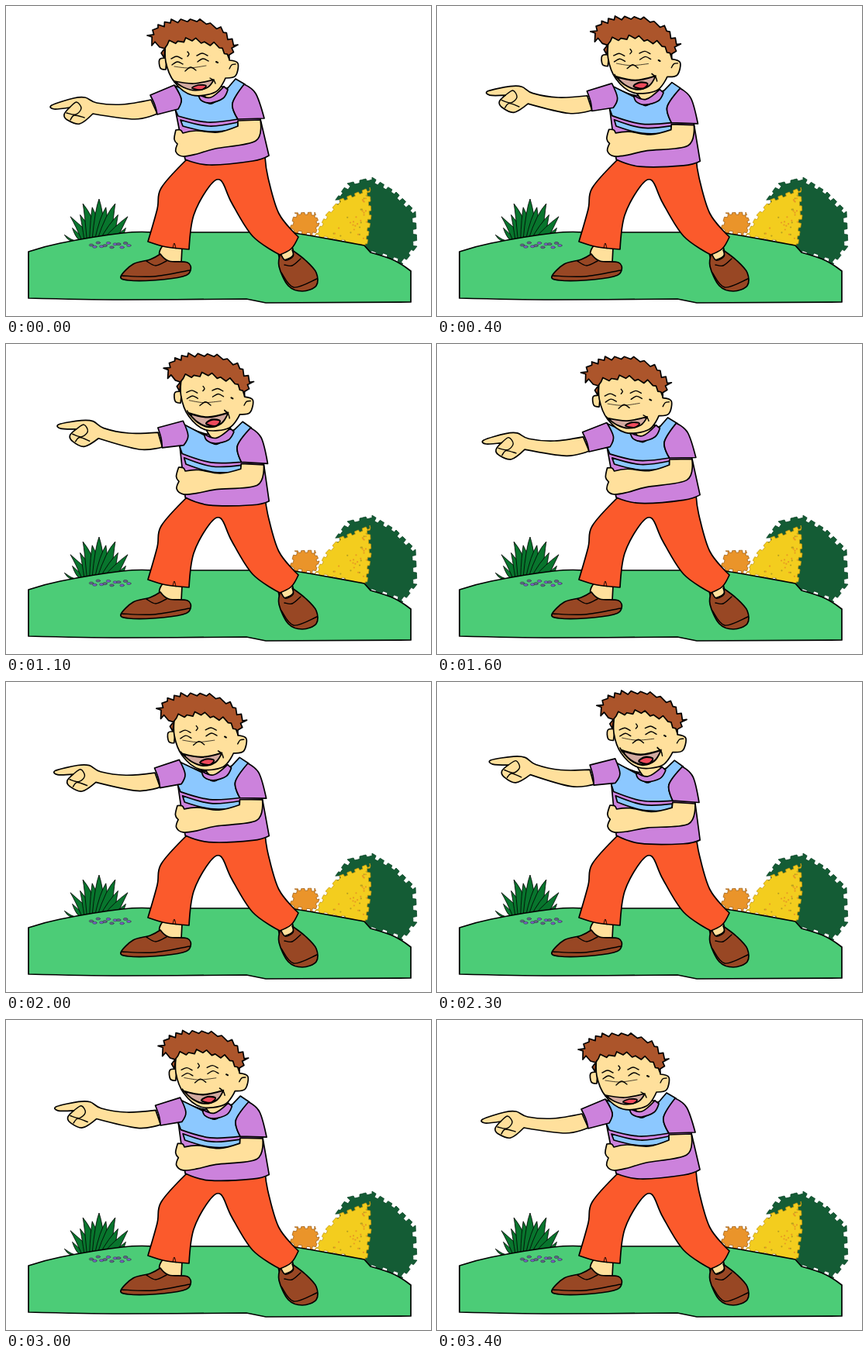
An HTML page for the animation above (3600 ms loop, 548 by 400 pixels).

```html
<!DOCTYPE html>
<html lang="en">
<head>
<meta charset="utf-8">
<title>Laughing boy</title>
<style>
html, body { margin: 0; width: 100%; height: 100%; overflow: hidden; background: #fff; }
svg { display: block; width: 548px; height: 400px; }
</style>
</head>
<body>
<svg id="stage" viewBox="0 0 548 400" stroke="#000" stroke-width="1.7" stroke-linejoin="round" stroke-linecap="round"></svg>
<script>
const NS = 'http://www.w3.org/2000/svg';
const stage = document.getElementById('stage');
const SKIN = '#ffe09c', PURPLE = '#cc82dc', BLUE = '#8cc8ff', PANTS = '#fb5a2c',
  HAIR = '#ac552b', SHOE = '#984724', GROUND = '#4ccc77', GRASS = '#08752d', LEAF = '#145c35';

function add(tag, attrs, parent = stage) {
  const el = document.createElementNS(NS, tag);
  for (const key in attrs) el.setAttribute(key, attrs[key]);
  return parent.appendChild(el);
}
const group = () => add('g', {});

let seed = 7;
const random = () => (seed = seed * 16807 % 2147483647) / 2147483647;

// Points are "x,y"; a trailing "!" makes a sharp corner.
const parse = text => text.split(' ').map(item => {
  const [x, y] = item.replace('!', '').split(',').map(Number);
  return { x, y, sharp: item.endsWith('!') };
});

// A smooth path through a few key points.
function curve(points, closed) {
  const n = points.length;
  const at = i => closed ? points[(i + n) % n] : points[Math.max(0, Math.min(n - 1, i))];
  const handle = (i, sign) => {
    const p = at(i), k = p.sharp ? 0 : sign / 6;
    return [p.x + (at(i + 1).x - at(i - 1).x) * k, p.y + (at(i + 1).y - at(i - 1).y) * k];
  };
  let d = `M${points[0].x} ${points[0].y}`;
  for (let i = 0; i < (closed ? n : n - 1); i++) {
    const end = at(i + 1);
    d += `C${handle(i, 1)} ${handle(i + 1, -1)} ${end.x} ${end.y}`;
  }
  return d + (closed ? 'Z' : '');
}

const shape = (parent, fill, keys) => add('path', { fill, d: curve(parse(keys), true) }, parent);
const line = (parent, keys, width = 1.4) =>
  add('path', { fill: 'none', 'stroke-width': width, d: curve(parse(keys), false) }, parent);

// A clockwise outline whose edges are cut inwards: spikes lean, notches are square.
function jagged(parent, fill, keys, spacing, depth, square, attrs) {
  const points = parse(keys), out = [];
  points.forEach((a, i) => {
    const b = points[(i + 1) % points.length];
    const dx = b.x - a.x, dy = b.y - a.y, length = Math.hypot(dx, dy);
    const count = Math.max(1, Math.round(length / spacing));
    const put = (t, inward) =>
      out.push([a.x + dx * t - dy / length * inward, a.y + dy * t + dx / length * inward]);
    for (let j = 0; j < count; j++) {
      const cut = depth * (.6 + .8 * random());
      put(j / count, 0);
      if (square) put((j + .5) / count, 0);
      put((j + (square ? .55 : .7)) / count, cut);
      if (square) put((j + .95) / count, cut);
    }
  });
  return add('polygon', { fill, points: out.join(' '), ...attrs }, parent);
}

function drawGrass() {
  const blades = 13;
  for (let i = 0; i < blades; i++) {
    const angle = Math.PI * (.04 + .92 * i / (blades - 1));
    const reach = i % 2 ? .82 : 1;
    const x = 120 - 45 * reach * Math.cos(angle), y = 302 - 53 * reach * Math.sin(angle);
    const base = 100 + 40 * i / (blades - 1);
    add('path', {
      fill: GRASS, 'stroke-width': .8,
      d: `M${base - 9} 302Q${(x + base) / 2 - 5} ${y + 12} ${x} ${y}Q${(x + base) / 2 + 5} ${y + 14} ${base + 9} 302Z`
    });
  }
}

function drawBushes() {
  const edge = color => ({ stroke: color, 'stroke-width': .8 });
  jagged(stage, LEAF, '425,250 440,229 472,221 503,240 528,265 530,310 512,333 470,318 430,300', 14, 4, true, edge('#0b4426'));
  jagged(stage, '#f3cd1e', '430,250 469,234 471,270 465,312 398,298 412,270', 11, 3, true, edge('#c69a10'));
  for (let i = 0; i < 32; i++) {
    const across = random(), down = random();
    add('circle', {
      cx: 465 - 52 * across * down, cy: 244 + 56 * down, r: 1.1,
      fill: i % 3 ? '#e89a24' : '#b8a020', stroke: 'none'
    });
  }
  jagged(stage, '#ea942a', '366,288 372,267 398,266 404,280 398,297 376,294', 9, 3, true, edge('#a4641a'));
}

function drawGround() {
  shape(stage, GROUND, '29,317! 70,306 150,293 190,292! 365,292! 402,298 462,309! 470,318! 500,328 522,342! 522,382! 335,383! 310,378! 150,379 29,377!');
  for (let i = 0; i < 12; i++) {
    add('ellipse', {
      cx: 110 + i * 4.4, cy: 308.5 + 3 * Math.sin(i * 2.3), rx: 2.8, ry: 1.6,
      fill: i % 2 ? '#7560c8' : '#5f6390', stroke: '#333', 'stroke-width': .5
    });
  }
}

function drawLegs() {
  shape(stage, SKIN, '202,309! 198,321 212,331 226,331! 227,312!');
  shape(stage, SKIN, '351,317! 355,328 370,322 368,308!');
  shape(stage, SHOE, '148,349 164,333 186,327 199,320! 210,329 234,331 238,341 228,349 190,354 158,354');
  line(stage, '149,348 190,349 237,341');
  line(stage, '181,329 193,335 207,329');
  shape(stage, SHOE, '354,319! 352,336 364,361 382,368 400,361 400,344 386,328 369,315! 370,323 360,328');
  line(stage, '355,344 371,363 401,352');
  line(stage, '359,334 369,335 380,326');
  shape(stage, PANTS, '232,199! 200,235 195,262 183,304! 207,311 236,314! 242,270 262,233 277,225 291,254 318,297 353,321! 368,313 377,298! 352,268 338,222 334,195! 285,192');
  line(stage, '215,312 217,306 219,313', 1);
}

function drawTorso(g) {
  shape(g, PURPLE, '219,104! 255,114 300,100! 328,146! 339,193! 318,200 262,205 231,198! 218,132!');
  shape(g, BLUE, '218,103! 249,116! 265,126 285,107! 296,94! 308,101! 292,126 299,146! 260,150 222,142! 218,133! 226,122');
  shape(g, BLUE, '225,147! 262,155 299,150! 299,159! 262,162 228,155!');
  shape(g, SKIN, '248,105! 262,120 281,104!');
  shape(g, PURPLE, '248,114! 264,118 281,104! 286,108! 280,119 264,125 252,122');
}

function drawFoldedArm(g) {
  shape(g, PURPLE, '307,101! 322,113 333,145! 299,146! 292,126');
  shape(g, SKIN, '299,148! 328,147! 322,174 270,184 246,191 228,194 219,188 221,178! 217,172 219,160! 225,160 228,164! 245,161 273,163 299,155!');
}

function drawPointingArm(g) {
  shape(g, SKIN, '59,128 87,119 102,118 117,125 150,127 187,121! 195,139! 166,146 112,139! 95,152 79,147 75,140 82,131! 62,133');
  line(g, '82,131 91,124 97,132 90,140 78,138');
  line(g, '83,147 88,141 101,144');
  shape(g, PURPLE, '186,115! 217,102! 226,120 222,133! 195,140! 192,128');
}

function drawHead(g) {
  shape(g, SKIN, '207,67! 198,69 199,80 206,82!');
  shape(g, SKIN, '206,45! 206,72 217,98 240,115 270,111 283,93! 296,90 299,74 288,70! 287,45! 245,32');
  line(g, '288,81 291,76 296,75');
  for (const [x, y] of [[213, 68], [246, 64]]) {
    line(g, `${x},${y} ${x + 7},${y - 3} ${x + 14},${y}`);
    line(g, `${x + 1},${y + 8} ${x + 8},${y + 4} ${x + 15},${y + 7}`);
  }
  line(g, '234,59 236,62 234,65');
  line(g, '271,72 273,73', 2);
  line(g, '231,84 238,79 245,83');
  line(g, '217,78 236,80 258,77', .7);
  jagged(g, HAIR, '182,38 196,24 213,17 250,17 277,27 299,50 288,69 275,54 240,45 208,50 204,67 198,53 188,51', 12, 4, false);
}

// The lips are drawn with their upper edge on y = 0 so that the jaw can drop by scaling.
function drawMouth(g) {
  shape(g, '#d3aaa0', '217,0! 242,3 268,-2! 260,8 244,12 229,8');
  shape(g, '#ee4a5c', '240,9 248,5 258,6 252,11');
  line(g, '215,-2 218,1 221,2');
  line(g, '263,-4 268,-1 270,3');
}

drawGrass();
drawBushes();
drawGround();
drawLegs();
const [torso, arm, head] = [group(), group(), group()];
drawTorso(torso);
drawFoldedArm(torso);
drawPointingArm(arm);
drawHead(head);
const mouth = add('g', {}, head);
drawMouth(mouth);

const pose = (g, x, y, angle, pivot) =>
  g.setAttribute('transform', `translate(${x} ${y}) rotate(${angle} ${pivot})`);

// Eight even steps up, nine down, twice per loop, then one extra hold.
function render(ms) {
  const step = Math.min(34, Math.floor(ms % 3600 / 100)) % 17;
  const lift = step <= 8 ? step / 8 : (17 - step) / 9;
  pose(torso, 0, 0, 7.6 * lift, '230 200');
  pose(arm, 13.5 * lift, -6.8 * lift, 11.6 * lift, '205 120');
  pose(head, 31.5 * lift, -6.2 * lift, 4 * lift, '240 40');
  mouth.setAttribute('transform', `translate(0 ${97 - 4 * lift}) scale(1 ${1 + .6 * lift})`);
}

const start = performance.now();
function tick() {
  render(performance.now() - start);
  requestAnimationFrame(tick);
}
tick();
</script>
</body>
</html>
```
